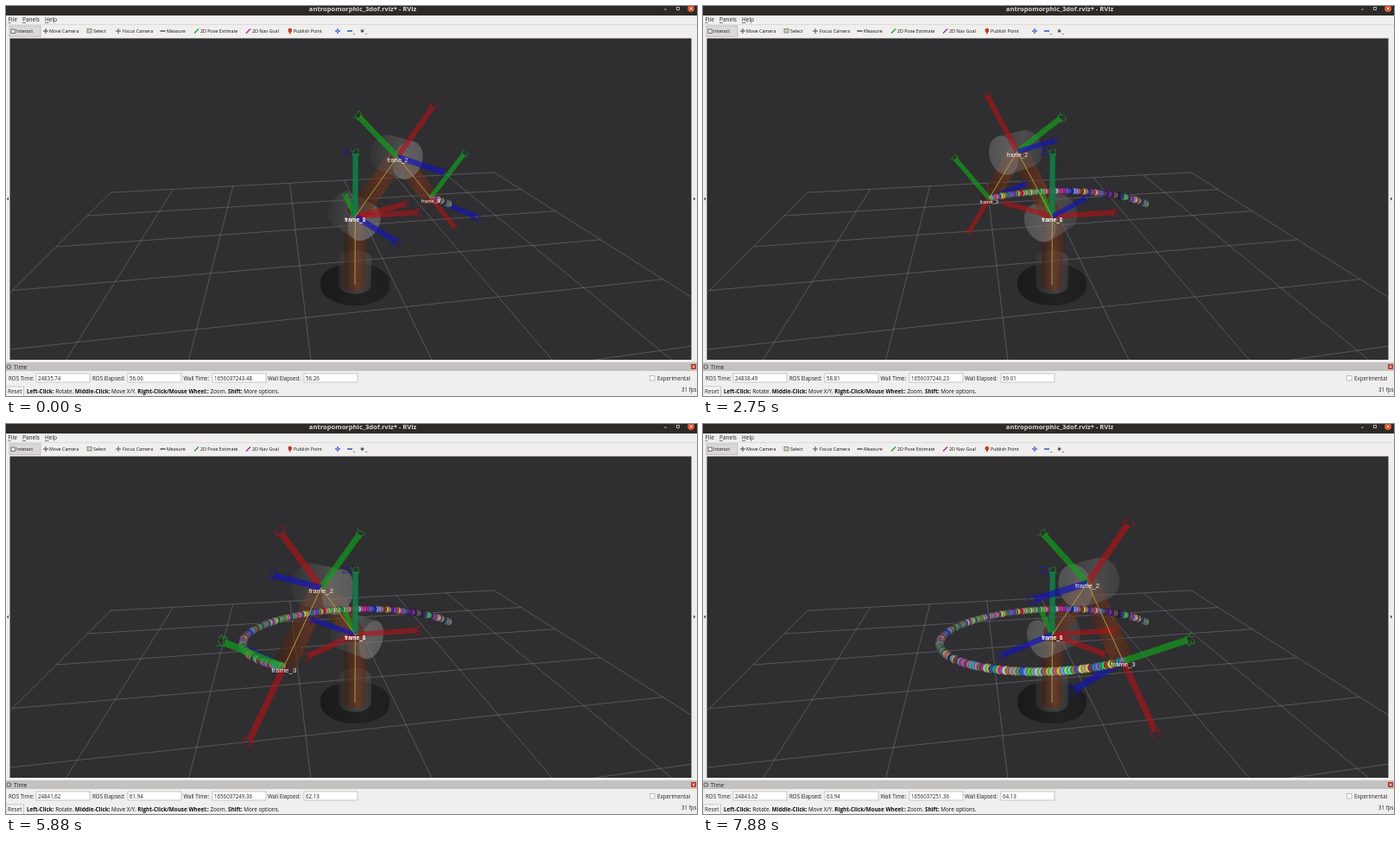
An HTML page with a canvas for the animation above (8000 ms loop, 800x452 px).

```html
<!DOCTYPE html>
<html>
<head>
<meta charset="utf-8">
<style>
html, body { margin: 0; width: 800px; height: 452px; overflow: hidden; background: #f0efee; }
canvas { display: block; }
</style>
</head>
<body>
<canvas id="stage" width="800" height="452"></canvas>
<script>
const ctx = document.getElementById('stage').getContext('2d');
const LOOP = 8000, STEP = 125;
const SHOULDER = 0.765, LINK = 0.715, AXIS = 0.62;
const RED = 'rgba(172,20,26,.64)', GREEN = 'rgba(18,160,28,.68)', BLUE = 'rgba(20,20,185,.68)';
const BROWN = [118, 54, 28], GREY = [122, 122, 122];
const UI = '"Open Sans", "Noto Sans", sans-serif';

// 3D helpers: x right, y away, z up
const add = (a, b, k = 1) => a.map((v, i) => v + k * b[i]);
const cross = (a, b) => [a[1] * b[2] - a[2] * b[1], a[2] * b[0] - a[0] * b[2], a[0] * b[1] - a[1] * b[0]];
const unit = a => { const n = Math.hypot(...a); return a.map(v => v / n); };
const rand = i => { const s = Math.sin(i * 12.9898) * 43758.5453; return s - Math.floor(s); };

function project([x, y, z]) {
  const depth = 4 + 0.1587 * x + 0.9224 * y - 0.352 * z, k = 449 / depth;
  return [399 + k * (0.0445 + 0.9855 * x - 0.1695 * y),
          224 + k * (0.882 - 0.0597 * x - 0.347 * y - 0.936 * z), k];
}

function rect(x, y, w, h, fill, line) {
  ctx.fillStyle = fill;
  ctx.fillRect(x, y, w, h);
  if (line) {
    ctx.strokeStyle = line;
    ctx.lineWidth = 0.8;
    ctx.strokeRect(x, y, w, h);
  }
}

function text(s, x, y, size, color = '#222', bold = false, align = 'left') {
  ctx.font = `${bold ? 'bold ' : ''}${size}px ${UI}`;
  ctx.fillStyle = color;
  ctx.textAlign = align;
  ctx.fillText(s, x, y);
  return ctx.measureText(s).width;
}

function line(points, color, width = 1) {
  ctx.beginPath();
  points.forEach(p => ctx.lineTo(p[0], p[1]));
  ctx.strokeStyle = color;
  ctx.lineWidth = width;
  ctx.stroke();
}

function dot(x, y, r, fill) {
  ctx.beginPath();
  ctx.arc(x, y, r, 0, 7);
  ctx.fillStyle = fill;
  ctx.fill();
}

function polygon(points, fill) {
  ctx.beginPath();
  points.forEach(p => ctx.lineTo(p[0], p[1]));
  ctx.fillStyle = fill;
  ctx.fill();
}

function hull(points) {
  const pts = [...points].sort((a, b) => a[0] - b[0] || a[1] - b[1]);
  const half = list => {
    const h = [];
    for (const p of list) {
      while (h.length > 1) {
        const [a, b] = h.slice(-2);
        if ((b[0] - a[0]) * (p[1] - a[1]) > (b[1] - a[1]) * (p[0] - a[0])) break;
        h.pop();
      }
      h.push(p);
    }
    return h.slice(0, -1);
  };
  return [...half(pts), ...half(pts.reverse())];
}

function ring(center, axis, r) {
  const u = unit(cross(axis, Math.abs(axis[2]) > 0.9 ? [1, 0, 0] : [0, 0, 1])), v = cross(axis, u);
  return Array.from({ length: 28 }, (_, i) => {
    const a = i * Math.PI / 14;
    return project(add(add(center, u, r * Math.cos(a)), v, r * Math.sin(a)));
  });
}

function tube(a, b, r, rgb, alpha, cap = 0) {
  const axis = unit(add(b, a, -1)), ends = [ring(a, axis, r), ring(b, axis, r)];
  const outline = hull(ends.flat()), xs = outline.map(p => p[0]);
  const fill = ctx.createLinearGradient(Math.min(...xs), 0, Math.max(...xs), 0);
  [0.5, 1, 0.75].forEach((k, i) =>
    fill.addColorStop([0, 0.6, 1][i], `rgba(${rgb.map(c => c * k)},${alpha})`));
  polygon(outline, fill);
  if (cap) polygon(project(a)[2] > project(b)[2] ? ends[0] : ends[1], `rgba(150,150,150,${cap})`);
}

function rod(from, dir, color, name, shift = 0) {
  const a = project(from), b = project(add(from, dir, AXIS));
  line([a, b], color, 0.052 * (a[2] + b[2]) / 2);
  ctx.save();
  ctx.translate(b[0] + shift, b[1]);
  if (!shift) ctx.rotate(Math.atan2(b[0] - a[0], a[1] - b[1]));
  ctx.font = `${0.08 * b[2]}px "DejaVu Sans", sans-serif`;
  ctx.textAlign = 'center';
  ctx.fillStyle = color;
  ctx.fillText(name, 0, 2);
  ctx.restore();
}

function label(name, at) {
  const [x, y, k] = project(at);
  ctx.font = `${k * 0.0552}px "Liberation Sans", Arial, sans-serif`;
  ctx.textAlign = 'center';
  ctx.fillStyle = '#f4f4f4';
  ctx.fillText(name, x, y + 6);
}

// Rows grow out of the far edge, away from the vanishing point
const VANISH = [308, 30];
function gridPoint(x, row) {
  const far = project([x, 3.5, 0]), depth = 449 / far[2];
  const grow = depth / (depth - 0.84 * row);
  return VANISH.map((v, i) => v + (far[i] - v) * grow);
}

function drawGrid() {
  const left = -3.62, cell = 1.014, color = 'rgba(160,160,164,.45)';
  for (let i = 0; i < 8; i++) {
    const x = left + i * cell;
    line([gridPoint(x, 0), gridPoint(x, 7)], color, 0.8);
    line([gridPoint(left, i), gridPoint(left + 7 * cell, i)], color, 0.8);
  }
}

const START = 13.5;
const phaseAt = t => 30.8 + 33.8 * t;
function pathPoint(deg) {
  const s = deg * Math.PI / 180;
  return [1.05 * Math.cos(s), 0.73 * Math.sin(s), SHOULDER];
}

function drawTrail(phase) {
  for (let deg = START, i = 5; deg <= phase; deg += 1.6, i++) {
    const [x, y, k] = project(pathPoint(deg));
    const rgb = [0, 1, 2].map(c => 30 + 190 * rand(i * 3 + c));
    dot(x, y, k * 0.035, `rgb(${rgb})`);
    ctx.strokeStyle = `rgb(${rgb.map(c => c * 0.45)})`;
    ctx.lineWidth = 0.8;
    ctx.stroke();
  }
}

function drawRobot(phase) {
  const hand = pathPoint(phase), shoulder = [0, 0, SHOULDER];
  const reach = Math.hypot(hand[0], hand[1]);
  const out = [hand[0] / reach, hand[1] / reach, 0], up = [0, 0, 1];
  const side = [out[1], -out[0], 0];
  const c = reach / 2 / LINK, s = Math.sqrt(1 - c * c);
  const inPlane = (h, v) => add(out.map(k => k * h), up, v);
  const upper = inPlane(c, s), lower = inPlane(c, -s);
  const elbow = add(shoulder, upper, LINK);
  const joint = p => tube(add(p, side, -0.2), add(p, side, 0.16), 0.185, GREY, 0.38, 0.3);

  tube([0, 0, 0], [0, 0, 0.05], 0.355, [26, 26, 26], 0.62);
  tube([0, 0, 0], [0, 0, 0.31], 0.165, GREY, 0.36);
  tube([0, 0, 0], [0, 0, 0.7], 0.105, BROWN, 0.6);
  joint(shoulder);
  tube(shoulder, elbow, 0.095, BROWN, 0.58);
  tube(elbow, hand, 0.09, BROWN, 0.58);
  joint(elbow);

  rod(hand, side, BLUE, 'Z3');
  drawTrail(phase);
  rod(shoulder, [1, 0, 0], RED, 'X0');
  rod(shoulder, [0, 1, 0], GREEN, 'Y0');
  rod(shoulder, up, BLUE, 'Z0', -9);
  rod(shoulder, out, RED, 'X1');
  rod(shoulder, up, GREEN, 'Y1');
  rod(shoulder, side, BLUE, 'Z1');
  rod(elbow, upper, RED, 'X2');
  rod(elbow, inPlane(-s, c), GREEN, 'Y2');
  rod(elbow, side, BLUE, 'Z2');
  rod(hand, lower, RED, 'X3');
  rod(hand, inPlane(s, c), GREEN, 'Y3');

  line([[0, 0, 0], shoulder, elbow, hand].map(project), '#c8a03c', 0.9);
  label('frame_0', shoulder);
  label('frame_1', shoulder);
  label('frame_2', elbow);
  label('frame_3', hand);
}

function drawTop() {
  rect(0, 0, 800, 11, '#2c2a28');
  text('antropomorphic_3dof.rviz* - RViz', 413, 5.5, 7.6, '#dedbd6', true, 'center');
  line([[762, 4], [765, 4]], '#ccc', 0.8);
  ctx.strokeRect(776.5, 1.5, 3, 3);
  dot(793, 3, 4, '#e2542c');
  line([[791.5, 1.5], [794.5, 4.5]], '#fff', 0.8);
  line([[794.5, 1.5], [791.5, 4.5]], '#fff', 0.8);

  [['File', 2.5, 3], ['Panels', 19, 4], ['Help', 45, 4.5]].forEach(([s, x, w]) => {
    text(s, x, 18, 6.5);
    line([[x, 19.5], [x + w, 19.5]], '#333', 0.6);
  });
  line([[0, 21.5], [800, 21.5]], '#d8d6d4', 0.8);
  rect(4, 23, 36, 12.5, '#dbd9d7', '#b8b5b2');
  [['Interact', 12], ['Move Camera', 50], ['Select', 101], ['Focus Camera', 135], ['Measure', 186],
   ['2D Pose Estimate', 225], ['2D Nav Goal', 285], ['Publish Point', 333]]
    .forEach(([s, x]) => text(s, x, 31, 5.35, '#111'));

  rect(6, 27, 4.5, 4.5, '#eee', '#555');
  line([[43, 29], [49, 29]], '#444');
  line([[46, 26], [46, 32]], '#444');
  rect(94, 26.5, 5, 4.5, '#c9d2b4', '#777');
  line([[127, 29], [133, 29]], '#555');
  line([[130, 26], [130, 32]], '#555');
  line([[178.5, 29], [184.5, 29]], '#777', 2);
  line([[218, 31.5], [223, 26.5]], '#1f9c31', 1.3);
  line([[278, 31.5], [283, 26.5]], '#9d22a0', 1.3);
  polygon([[326.5, 28.5], [331, 28.5], [328.8, 33]], '#c53a2a');
  dot(328.8, 28, 2.3, '#c53a2a');
  line([[381, 29], [387, 29]], '#7186d8', 2);
  line([[384, 26], [384, 32]], '#7186d8', 2);
  line([[395, 29], [401, 29]], '#6079d2', 2);
  dot(412.5, 29, 2.4, '#bbb');
  dot(412.5, 29, 1.2, '#333');
  [403, 417].forEach(x => dot(x, 32.5, 0.7, '#555'));
}

function drawBottom(t) {
  rect(0, 413, 800, 10, '#c4c2c0');
  dot(3.3, 418, 2.6, '#444');
  dot(3.3, 418, 1.8, '#eee');
  line([[3.3, 416.5], [3.3, 418.2], [4.5, 418.2]], '#444', 0.6);
  text('Time', 9, 420.5, 6.7);
  rect(793.5, 415.5, 5, 5, '#d43a32', '#a82a24');
  line([[794.7, 416.7], [797.3, 419.3]], '#fff', 0.8);
  line([[797.3, 416.7], [794.7, 419.3]], '#fff', 0.8);

  [['ROS Time:', 3, 35, 24835.74], ['ROS Elapsed:', 100, 141, 56.06],
   ['Wall Time:', 205.5, 239, 1656037243.48], ['Wall Elapsed:', 303, 345, 56.26]]
    .forEach(([s, x, box, base]) => {
      text(s, x, 433.5, 6.2);
      rect(box, 426, 62, 10, '#fff', '#bdbab7');
      text((base + t).toFixed(2), box + 2, 433.5, 6.2);
    });
  rect(745.5, 428.5, 5.5, 5.5, '#fff', '#b5b2af');
  text('Experimental', 754, 433.5, 6.2);

  rect(0, 441, 20.5, 12, '#f7f6f5', '#bdbab7');
  text('Reset', 2, 449, 6.4);
  let x = 24;
  ['Left-Click:', ' Rotate. ', 'Middle-Click:', ' Move X/Y. ', 'Right-Click/Mouse Wheel::', ' Zoom. ',
   'Shift:', ' More options.'].forEach((s, i) => x += text(s, x, 448.5, 6.35, '#111', i % 2 === 0));
  text('31 fps', 799.5, 447, 6.2, '#222', false, 'right');
}

function draw(t) {
  rect(0, 0, 800, 452, '#f0efee');
  rect(4.5, 37.5, 789, 372.5, '#2f2e30');
  ctx.save();
  ctx.beginPath();
  ctx.rect(4.5, 37.5, 789, 372.5);
  ctx.clip();
  drawGrid();
  drawRobot(phaseAt(t));
  ctx.restore();
  polygon([[3, 221.5], [3, 225.5], [0.8, 223.5]], '#444');
  polygon([[796, 221.5], [796, 225.5], [798.2, 223.5]], '#444');
  drawTop();
  drawBottom(t);
}

const origin = performance.now();
function tick() {
  const ms = (performance.now() - origin) % LOOP;
  draw(Math.floor(ms / STEP) * STEP / 1000);
  requestAnimationFrame(tick);
}
tick();
</script>
</body>
</html>
```
